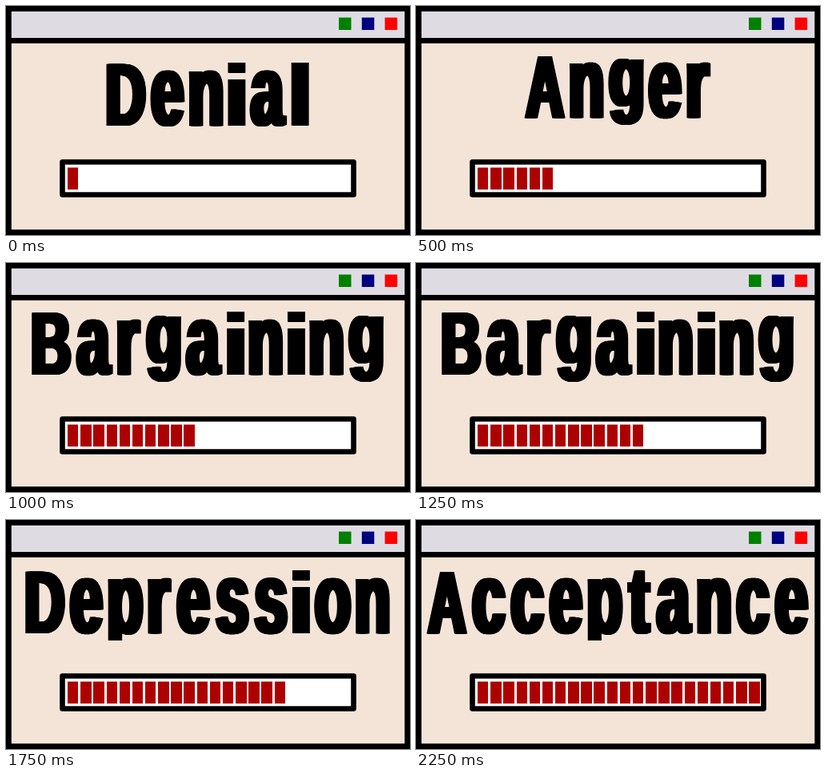
These frames come from a looping animation (505 by 287 pixels, 2.5 s). An HTML page with a canvas:

```html
<!DOCTYPE html>
<html lang="en">
<head>
<meta charset="utf-8">
<title>Five stages</title>
<style>
  html, body { margin: 0; width: 100%; height: 100%; overflow: hidden; background: #000; }
  canvas { display: block; width: 505px; height: 287px; }
</style>
</head>
<body>
<canvas id="stage" width="505" height="287"></canvas>
<script>
const ctx = document.getElementById('stage').getContext('2d');
const LOOP = 2500, STEP = 250;
const SIZE = 110, PEN = 2, SMEAR = 3.4, GAP = 4;
const words = [
  { text: 'Denial', base: 149.5 },
  { text: 'Anger', base: 139.5 },
  { text: 'Bargaining', base: 139.5 },
  { text: 'Depression', base: 142 },
  { text: 'Acceptance', base: 142 }
];
const counts = [1, 3, 6, 8, 10, 13, 15, 17, 19, 22];

function box(color, x, y, w, h) {
  ctx.fillStyle = color;
  ctx.fillRect(x, y, w, h);
}

// Heavy condensed style: tall x-height, short descenders
function styleOf(ch) {
  if (ch === 'A') return { sx: 0.59, sy: 1, lift: 0 };
  if (ch < 'a') return { sx: 0.63, sy: 1, lift: 0 };
  if (ch === 'i' || ch === 'l') return { sx: 0.93, sy: 0.96, lift: 0 };
  if (ch === 't') return { sx: 0.67, sy: 1.06, lift: 0 };
  if (ch === 'g') return { sx: 0.67, sy: 0.98, lift: 13 };
  return { sx: 0.67, sy: 1.13, lift: 0 };
}

function measure(ch) {
  const m = ctx.measureText(ch);
  const style = styleOf(ch);
  const left = m.actualBoundingBoxLeft * style.sx;
  const edge = SMEAR + PEN * style.sx / 2;
  const ink = left + m.actualBoundingBoxRight * style.sx;
  return { ch, ...style, start: left + edge, width: ink + 2 * edge };
}

function drawWord({ text, base }) {
  ctx.save();
  ctx.beginPath();
  ctx.rect(0, 47, 505, 104);
  ctx.clip();
  ctx.font = `bold ${SIZE}px "Liberation Sans", Arial, sans-serif`;
  ctx.fillStyle = ctx.strokeStyle = '#000';
  ctx.lineWidth = PEN;
  ctx.miterLimit = 3;
  const glyphs = [...text].map(measure);
  const total = glyphs.reduce((sum, g) => sum + g.width + GAP, -GAP);
  let x = 252.5 - total / 2;
  for (const g of glyphs) {
    for (let dx = -SMEAR; dx <= SMEAR; dx += SMEAR / 4) {
      ctx.save();
      ctx.translate(x + g.start + dx, base - PEN / 2 - g.lift);
      ctx.scale(g.sx, g.sy);
      ctx.fillText(g.ch, 0, 0);
      ctx.strokeText(g.ch, 0, 0);
      ctx.restore();
    }
    x += g.width + GAP;
  }
  ctx.restore();
}

function drawWindow() {
  box('#000', 0, 0, 505, 287);
  box('#dedce2', 6.8, 6.8, 491.5, 33.2);
  box('#f4e4d8', 6.8, 46.8, 491.5, 233.4);
  ['#008000', '#000080', '#ff0000'].forEach((color, i) =>
    box(color, 416 + i * 28.8, 14.5, 15.5, 15.5));
}

function drawProgress(count) {
  ctx.lineJoin = 'round';
  ctx.lineWidth = 6.6;
  ctx.strokeStyle = '#000';
  ctx.fillStyle = '#fff';
  ctx.beginPath();
  ctx.rect(70.5, 195.5, 364, 41);
  ctx.fill();
  ctx.stroke();
  ctx.lineJoin = 'miter';
  for (let i = 0; i < count; i++) {
    const x = 77.05 + i * 16.16;
    const left = Math.round(x);
    box('#ad0000', left, 202.5, Math.round(x + 13.4) - left, 27.5);
  }
}

let shown = -1;
function tick() {
  const step = Math.floor(performance.now() % LOOP / STEP);
  if (step !== shown) {
    shown = step;
    drawWindow();
    drawWord(words[step >> 1]);
    drawProgress(counts[step]);
  }
  requestAnimationFrame(tick);
}
tick();
</script>
</body>
</html>
```
